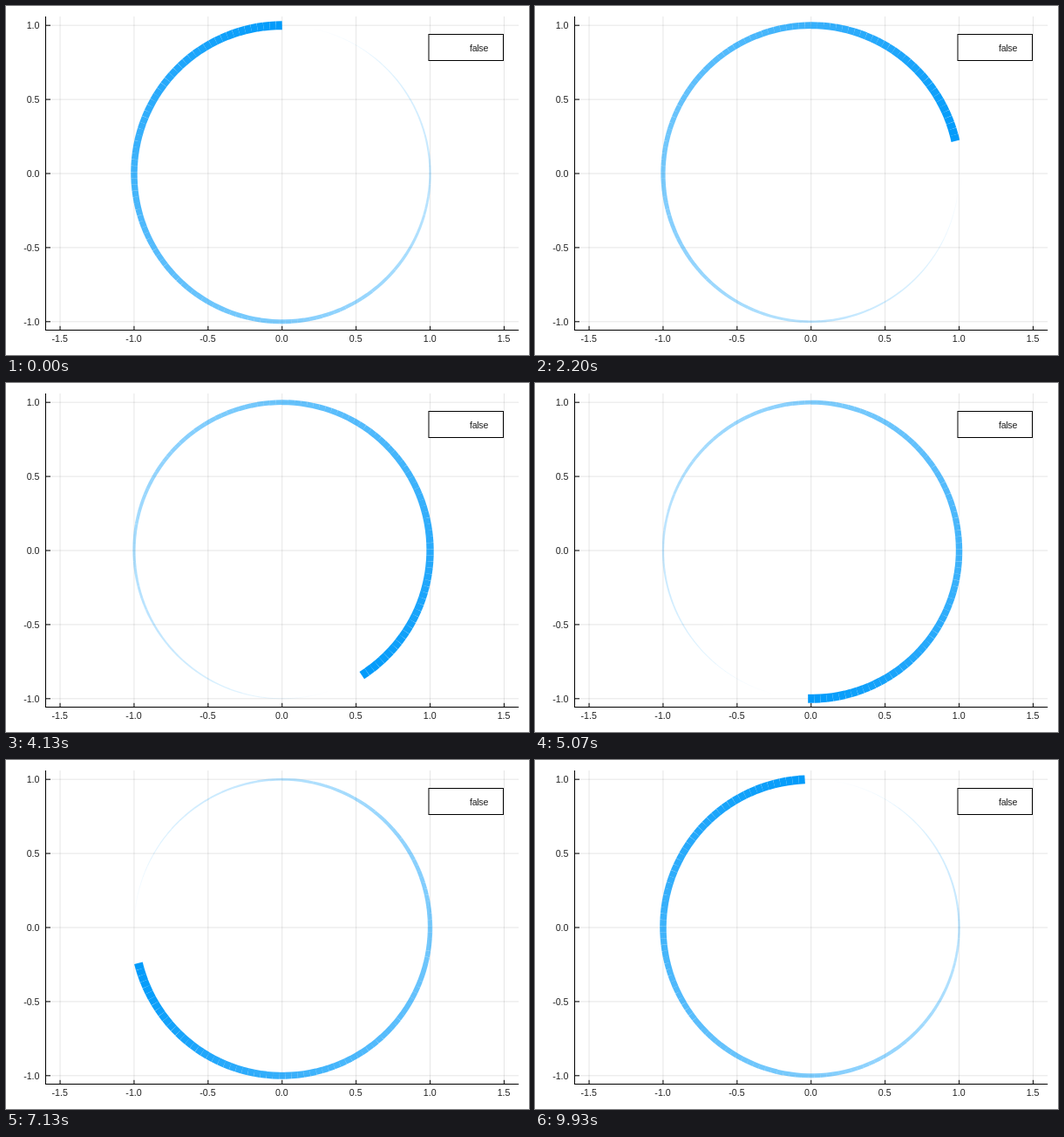
An HTML page with a canvas that plays this animation: 600 by 400 pixels, repeating every 9990 ms.

```html
<!DOCTYPE html>
<html lang="en">
<head>
<meta charset="utf-8">
<title>Circle plot</title>
<style>
  html, body { margin: 0; width: 100%; height: 100%; overflow: hidden; background: #fff; }
  canvas { display: block; }
</style>
</head>
<body>
<canvas id="plot" width="600" height="400"></canvas>
<script>
const ctx = document.getElementById('plot').getContext('2d');

const LOOP = 9990;
const POINTS = 150;
const SEGMENTS = POINTS - 1;
const MAX_WIDTH = 10;
const AREA = { left: 45.5, right: 588.2, top: 12, bottom: 371.8 };
const ORIGIN = { x: 316.75, y: 192 };
const UNIT = 169.8;

const toX = v => ORIGIN.x + v * UNIT;
const toY = v => ORIGIN.y - v * UNIT;

function line(x1, y1, x2, y2) {
  ctx.beginPath();
  ctx.moveTo(x1, y1);
  ctx.lineTo(x2, y2);
  ctx.stroke();
}

function label(text, x, y, align, spacing = '0px') {
  ctx.font = '10.67px "Liberation Sans", Arial, sans-serif';
  ctx.letterSpacing = spacing;
  ctx.textAlign = align;
  ctx.textBaseline = 'alphabetic';
  ctx.fillStyle = '#222';
  ctx.fillText(text, x, y);
}

function ticks(limit) {
  const values = [];
  for (let v = -limit; v <= limit; v += 0.5) values.push(v);
  return values;
}

function drawAxes() {
  const { left, right, top, bottom } = AREA;
  const xTicks = ticks(1.5), yTicks = ticks(1);
  ctx.lineWidth = 1;

  ctx.strokeStyle = 'rgba(0, 0, 0, 0.1)';
  for (const v of xTicks) line(toX(v), top, toX(v), bottom);
  for (const v of yTicks) line(left, toY(v), right, toY(v));

  ctx.strokeStyle = '#000';
  line(left, top, left, bottom + 0.2);
  line(left - 0.5, 371.5, right, 371.5);

  for (const v of xTicks) {
    line(toX(v), bottom, toX(v), bottom - 5);
    label(v.toFixed(1), toX(v) - 0.4, 385, 'center');
  }
  for (const v of yTicks) {
    line(left, toY(v), left + 5.5, toY(v));
    label(v.toFixed(1), 38.5, toY(v) + 4, 'right');
  }
}

// Closed ring whose width and opacity grow from tail to head.
function drawRing(step) {
  const point = i => {
    const angle = 2 * Math.PI * ((step + i) % POINTS) / SEGMENTS;
    return [toX(Math.sin(angle)), toY(Math.cos(angle))];
  };
  ctx.lineCap = 'butt';
  for (let i = 1; i < SEGMENTS; i++) {
    const strength = i / SEGMENTS;
    ctx.lineWidth = MAX_WIDTH * strength;
    ctx.strokeStyle = `rgba(0, 154, 250, ${strength})`;
    line(...point(i), ...point(i + 1));
  }
}

function drawLegend() {
  ctx.fillStyle = '#fff';
  ctx.fillRect(485, 32.5, 85.5, 30);
  ctx.strokeStyle = '#000';
  ctx.lineWidth = 1;
  ctx.strokeRect(485, 32.5, 85.5, 30);
  label('false', 532, 52, 'left', '-0.3px');
}

// Fifteen steps a second, on a 70, 60, 70 ms beat.
function stepAt(time) {
  const beat = time % 200;
  return 3 * Math.floor(time / 200) + (beat >= 70) + (beat >= 130);
}

function render(now) {
  ctx.fillStyle = '#fff';
  ctx.fillRect(0, 0, 600, 400);
  drawAxes();
  drawRing(stepAt(now % LOOP));
  drawLegend();
}

let start;
function tick(now) {
  start ??= now;
  render(Math.max(0, now - start));
  requestAnimationFrame(tick);
}
render(0);
requestAnimationFrame(tick);
</script>
</body>
</html>
```
